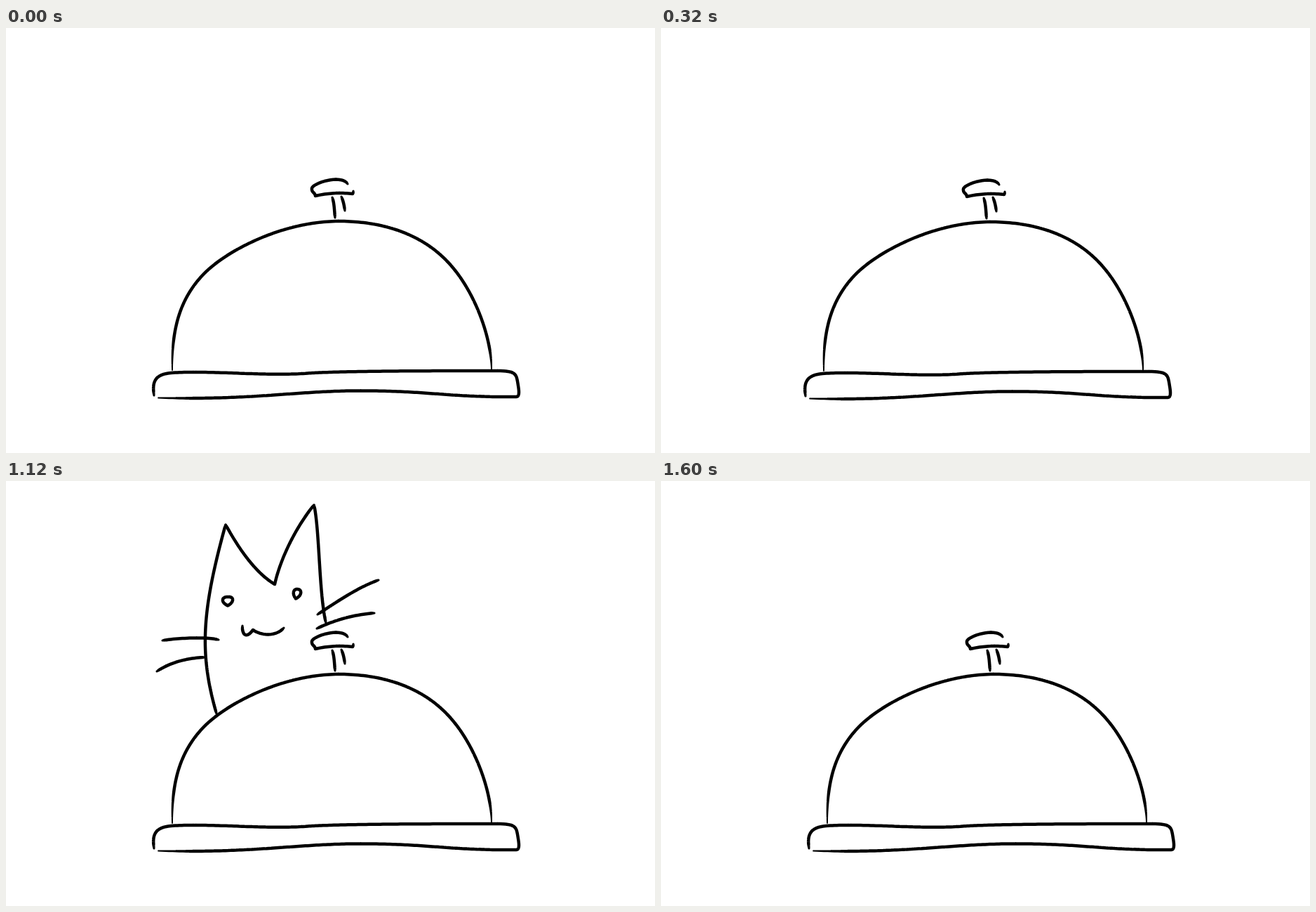
An HTML page with a canvas for the animation above (1.84 s loop, 925 by 605 pixels).

```html
<!DOCTYPE html>
<html lang="en">
<head>
<meta charset="utf-8">
<title>Cat behind a bell</title>
<style>
html, body { margin: 0; width: 100%; height: 100%; overflow: hidden; background: #fff; }
canvas { display: block; }
</style>
</head>
<body>
<canvas id="stage" width="925" height="605"></canvas>
<script>
const LOOP = 1840, BEAT = 80, FLOOR = 332;
const ctx = document.getElementById('stage').getContext('2d');

// A pen stroke: start point, then two handles and an end point per curve
const pen = (text, head = 4, tail = head) =>
  ({ p: text.split(' ').map(xy => xy.split(',').map(Number)), head, tail });

const bell = [
  pen('237,487 236,430 247,386 282,350 314,317 396,274 478,275 548,276 604,299 640,345 671,384 692,443 692,486', 45, 30),
  pen('211,523 208,504 212,493 235,491 290,487 370,496 430,491.5 480,488 620,488 700,488 725,488 727,492 729,503 731,515 733,525 727,525 640,526 600,517 520,516.5 420,515 360,530 217,526.5', 6, 50),
  pen('487,222 478,207 432,222 436,230 436,234 440,234 441,239 458,235 476,234 494,236 495,235 495,234 495,232'),
  pen('465,241 468,250 468,260 469,270'),
  pen('478,240 481,247 482,253 483,260')
];

const lowEars = [
  pen('300,348 275,319 262,290 255,239'),
  pen('255,239 272,257 287,277 308,277 340,277 351,240 361,190'),
  pen('361,190 386,208 400,245 418,276')
];
const lowEyes = [
  pen('312,326 306,316 303,298 312,310'),
  pen('378,293 373,284 374,276 381,281')
];
const body = [
  pen('300,331 275,245 279,185 313,62'),
  pen('313,62 332,97 356,131 383,147 390,115 410,70 439,34'),
  pen('439,34 447,70 446,160 456,202')
];
// Eyes, mouth, whiskers
const faceUp = [
  pen('316,177.5 305,172 308,164.5 316,165 326,164 325,173 316,177.5', 0),
  pen('413,167.5 407,160 410,153 416,154 423,155 421,164 413,167.5', 0),
  pen('337,206 336,216 341,227 352,212 365,221 386,221 396,209'),
  pen('223,227 248,223 288,222 303,226'),
  pen('215,271 236,257 260,252 283,251'),
  pen('444,190 470,173 502,151 531,141'),
  pen('443,210 460,202 487,191 525,188')
];
const faceDown = [
  pen('309,186 307,180 307,174 309,173 319,178 316,183 309,186', 0),
  pen('406,170 408,163 408,155 414,155 420,156 417,167 406,170', 0),
  pen('331,205 332,221 334,215 343,210 357,214 372,217 385,206'),
  pen('206,225 232,234 280,236 300,211'),
  pen('213,285 238,281 262,258 288,245'),
  pen('436,185 460,196 515,184 537,157'),
  pen('445,202 467,214 492,219 525,205')
];

const warp = (pens, f) => pens.map(s => ({ ...s, p: s.p.map(f) }));
const move = (pens, dx, dy) => warp(pens, ([x, y]) => [x + dx, y + dy]);
const lean = (pens, skew, tall) =>
  warp(pens, ([x, y]) => [x + skew * (FLOOR - y), FLOOR - tall * (FLOOR - y)]);
const mix = (a, b, k) => a.map((s, i) => ({
  ...s, p: s.p.map((xy, j) => xy.map((v, n) => v + (b[i].p[j][n] - v) * k))
}));

// One pose per beat, from the first peek until the cat is gone
const FIRST = 11;
const peek = [...lowEars, ...lowEyes];
const cat = [
  peek,
  [...mix(lowEars, body, 0.55), ...move(faceDown, -6, 70)],
  lean([...body, ...faceDown], 0, 1.06),
  [...body, ...faceUp],
  [...body, ...mix(faceUp, faceDown, 0.5)],
  [...body, ...faceDown],
  lean([...body, ...move(faceUp, 18, 0)], 0.14, 1.06),
  lean([...body, ...move(faceUp, 30, 0)], 0.24, 0.85),
  move(peek, 0, -18)
];
// The bell rings twice: rest, left, right
const ring = [bell, move(bell, -5, 1), move(bell, 8, -4)];

const scene = beat => [...ring[beat < 6 ? beat % 3 : 0], ...(cat[beat - FIRST] || [])];

function trace(p) {
  const out = [p[0]];
  for (let i = 0; i + 3 < p.length; i += 3) {
    const [a, b, c, d] = p.slice(i, i + 4);
    const n = 6 + Math.ceil(Math.hypot(d[0] - a[0], d[1] - a[1]) / 4);
    for (let j = 1; j <= n; j++) {
      const t = j / n, u = 1 - t;
      out.push([0, 1].map(k =>
        u * u * u * a[k] + 3 * u * u * t * b[k] + 3 * u * t * t * c[k] + t * t * t * d[k]));
    }
  }
  return out;
}

// Ends thin out over the head and tail lengths, more so over long ones
function taper(d, len) {
  const thin = len > 10 ? 0.4 : 0.7;
  return d < len ? thin + (1 - thin) * d / len : 1;
}

function draw({ p, head, tail }) {
  const c = trace(p), at = [0];
  for (let i = 1; i < c.length; i++)
    at.push(at[i - 1] + Math.hypot(c[i][0] - c[i - 1][0], c[i][1] - c[i - 1][1]));
  const total = at[at.length - 1];
  const radius = at.map(d => 2.25 * Math.min(taper(d, head), taper(total - d, tail)));
  ctx.beginPath();
  c.forEach(([x, y], i) => {
    const r = radius[i];
    ctx.moveTo(x + r, y);
    ctx.arc(x, y, r, 0, 2 * Math.PI);
    if (!i) return;
    const [px, py] = c[i - 1], q = radius[i - 1], len = at[i] - at[i - 1] || 1;
    const nx = (py - y) / len, ny = (x - px) / len;
    ctx.moveTo(px - nx * q, py - ny * q);
    ctx.lineTo(x - nx * r, y - ny * r);
    ctx.lineTo(x + nx * r, y + ny * r);
    ctx.lineTo(px + nx * q, py + ny * q);
    ctx.closePath();
  });
  ctx.fill();
}

const start = performance.now();
let shown;
function tick(now) {
  const beat = Math.floor(Math.max(0, now - start) % LOOP / BEAT);
  if (beat !== shown) {
    shown = beat;
    ctx.clearRect(0, 0, 925, 605);
    scene(beat).forEach(draw);
  }
  requestAnimationFrame(tick);
}
tick(start);
</script>
</body>
</html>
```
